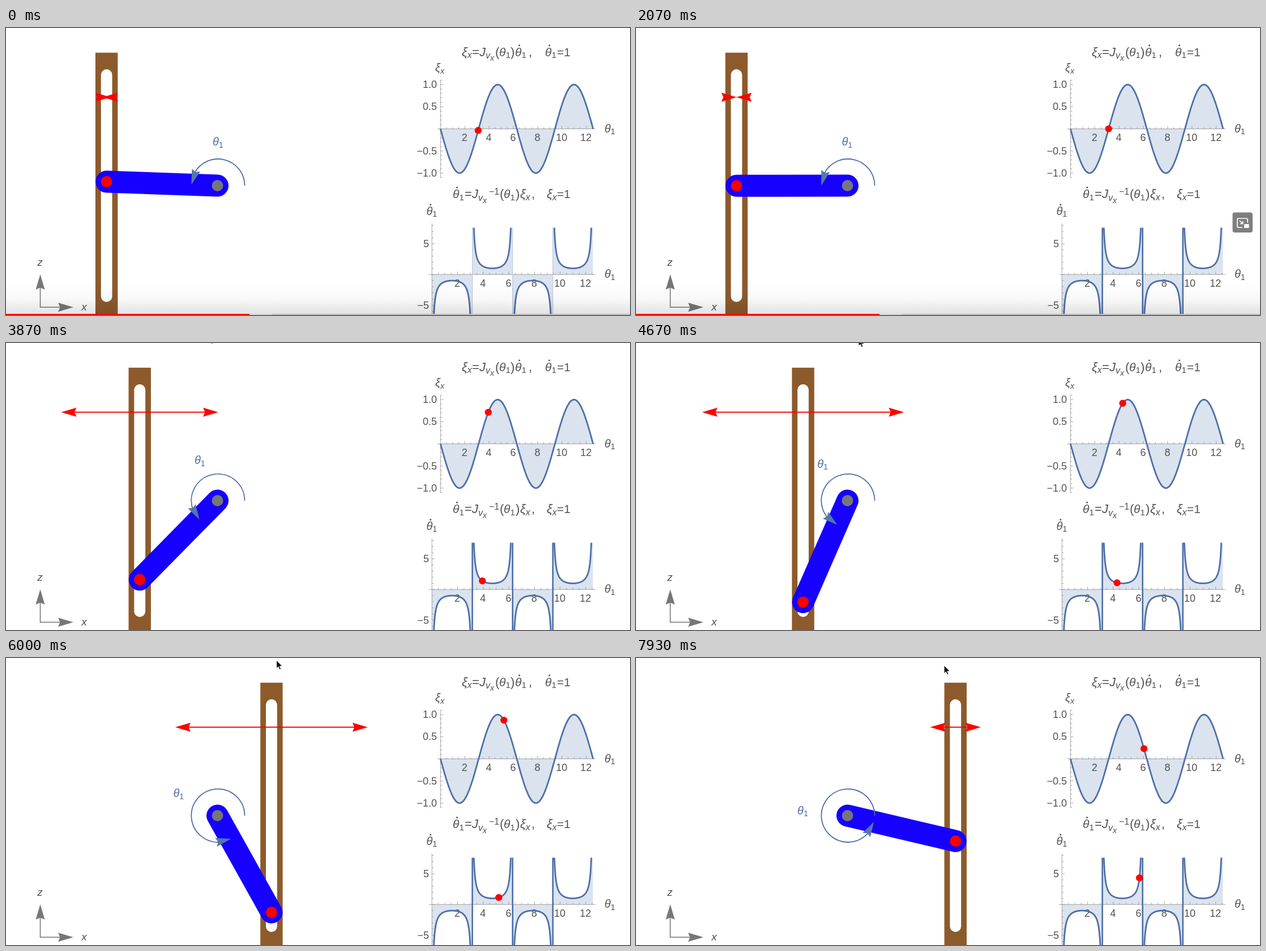
Animation, 1102 px wide and 508 px high, one loop 8 s. Source, as an HTML page:

```html
<!DOCTYPE html>
<html lang="en">
<head>
<meta charset="utf-8">
<title>Slotted link mechanism</title>
<style>
html, body { margin: 0; width: 100%; height: 100%; overflow: hidden; background: #fff; }
svg { display: block; }
text { font-family: "Liberation Sans", Arial, sans-serif; fill: #525252; }
.it { font-style: italic; }
.up { font-style: normal; }
</style>
</head>
<body>
<svg id="stage" width="1102" height="508" viewBox="0 0 1102 508">
  <defs>
    <linearGradient id="shade" x1="0" y1="0" x2="0" y2="1">
      <stop offset="0" stop-color="#000" stop-opacity="0"/>
      <stop offset=".5" stop-color="#000" stop-opacity=".025"/>
      <stop offset="1" stop-color="#000" stop-opacity=".12"/>
    </linearGradient>
    <clipPath id="plotClip"><rect x="752" y="353.5" width="285" height="160"/></clipPath>
  </defs>
</svg>
<script>
const LOOP = 8000, STEP = 1000 / 15;
const PIVOT = [373.5, 279], LINK = 196, SPEED = 194.5;
const BLUE = '#4c6fa9', FILL = '#dbe3ee', AXIS = '#8f8f8f', HEAD = 27;
const stage = document.getElementById('stage');

// Crank angle over time; cursor position over crank angle
const ANGLE = [[1800, 3.106], [2067, 3.143], [2134, 3.143], [3000, 3.7], [3533, 3.79],
  [4400, 4.17], [4467, 4.17], [4667, 4.301], [4734, 4.301], [5333, 4.74], [5400, 4.983],
  [6200, 5.3], [6733, 5.557], [7067, 5.72], [7933, 6.051]];
const CURSOR = [[3.7, 335, -19], [4.301, 393, -9], [4.983, 457, 2], [5.557, 507, 7], [6.051, 544, 13]];
const PIP = [[267, 0], [1000, 1], [2670, 1], [2930, 0]];
const BAR = [[2200, 1], [2600, 0]];

function lerp(table, x, col = 1) {
  if (x <= table[0][0]) return table[0][col];
  for (let i = 1; i < table.length; i++) {
    const a = table[i - 1], b = table[i];
    if (x <= b[0]) return a[col] + (b[col] - a[col]) * (x - a[0]) / (b[0] - a[0]);
  }
  return table[table.length - 1][col];
}

function set(node, attrs) {
  for (const k in attrs) node.setAttribute(k, attrs[k]);
  return node;
}
function add(tag, attrs, parent = stage) {
  return parent.appendChild(set(document.createElementNS('http://www.w3.org/2000/svg', tag), attrs));
}
function path(d, attrs, parent) {
  return add('path', { d, fill: 'none', ...attrs }, parent);
}
function text(str, x, y, size, attrs = {}, parent) {
  const node = add('text', { x, y, 'font-size': size, ...attrs }, parent);
  node.textContent = str;
  return node;
}
const italic = { class: 'it' };

// Letter with a subscript (digits upright), optionally dotted
function symbol(letter, sub, x, y, size, dotted, parent, fill) {
  const paint = fill ? { style: `fill:${fill}` } : {};
  const node = text(letter, x, y, size, { ...italic, ...paint }, parent);
  const style = sub === '1' ? 'up' : 'it';
  add('tspan', { dy: size * .18, 'font-size': size * .72, class: style }, node).textContent = sub;
  if (dotted) add('circle', { cx: x + size * .36, cy: y - size * .89, r: 1.5, fill: '#525252' }, parent);
}

// Notched arrow head with its tip at (x, y), pointing along angle a
function head(x, y, a, half = 8) {
  const c = Math.cos(a), s = Math.sin(a);
  const pts = [[0, 0], [-HEAD, half], [-HEAD * .87, 0], [-HEAD, -half]];
  return 'M' + pts.map(([u, v]) => `${x + u * c - v * s} ${y + u * s + v * c}`).join('L') + 'Z';
}

function curve(x0, sx, y0, f, from, to) {
  const pts = [];
  for (let i = 0; i <= 160; i++) {
    const q = from + (to - from) * i / 160;
    pts.push(`${(x0 + sx * q).toFixed(2)} ${(y0 + f(q)).toFixed(2)}`);
  }
  return pts.join('L');
}

function axes(p) {
  let d = `M${p.left} ${p.y}H1041M${p.x} ${p.top}V${p.bottom}`;
  for (let i = 1; i <= 25; i++) d += `M${p.x + i * p.sx / 2} ${p.y}v${i % 4 ? -3 : -5}`;
  for (let i = -p.ticks; i <= p.ticks; i++) {
    const y = p.y - i * p.tick;
    if (y > p.top && y < p.bottom) d += `M${p.x} ${y}h${i % 5 ? 3 : 5}`;
  }
  path(d, { stroke: AXIS, 'stroke-width': .8 });
  for (let n = 2; n <= 12; n += 2)
    text(n, p.x + n * p.sx - .5, p.y + 21.5, 18, { 'text-anchor': 'middle' });
  for (const [label, v] of p.labels)
    text(label, p.labelX, p.y - v * p.tick + 6, 18, { 'text-anchor': 'end' });
  symbol('θ', '1', 1057, p.y + 6, 20);
}

// Upper plot
const up = { x: 767.3, y: 178.5, sx: 21.45, left: 762, top: 92, bottom: 265, tick: 7.83, ticks: 11, labelX: 761,
  labels: [['1.0', 10], ['0.5', 5], ['−0.5', -5], ['−1.0', -10]] };
const sine = 'M' + curve(up.x, up.sx, up.y, q => 78.3 * Math.sin(q), 0, 4 * Math.PI);
path(sine + `L${up.x + up.sx * 4 * Math.PI} ${up.y}H${up.x}Z`, { fill: FILL });
axes(up);
path(sine, { stroke: BLUE, 'stroke-width': 2.8 });

symbol('ξ', 'x', 805, 49.5, 22);
text('=', 823, 49.5, 22);
text('J', 836, 49.5, 22, italic);
text('v', 847, 54, 16, italic);
text('x', 855, 58, 14, italic);
text('(', 864, 49.5, 22);
symbol('θ', '1', 871, 49.5, 21);
text(')', 891, 49.5, 22);
symbol('θ', '1', 899, 49.5, 21, true);
text(',', 923, 49.5, 22);
symbol('θ', '1', 952, 49.5, 21, true);
text('=1', 973, 49.5, 21);
symbol('ξ', 'x', 758, 77, 20);

// Lower plot
const low = { x: 752.2, y: 436.3, sx: 22.63, left: 747, top: 346, bottom: 508, tick: 10.85, ticks: 8, labelX: 747,
  labels: [['5', 5], ['−5', -5]] };
const lowArea = add('g', { 'clip-path': 'url(#plotClip)' });
axes(low);
const lowLines = add('g', { 'clip-path': 'url(#plotClip)' });
let walls = '';
for (let n = 0; n < 4; n++) {
  const a = n * Math.PI + .02, b = (n + 1) * Math.PI - .02;
  const d = curve(low.x, low.sx, low.y, q => low.tick / Math.sin(q), a, b);
  path(`M${low.x + low.sx * n * Math.PI} ${low.y}L${d}L${low.x + low.sx * (n + 1) * Math.PI} ${low.y}Z`,
    { fill: FILL }, lowArea);
  path('M' + d, { stroke: BLUE, 'stroke-width': 2.8 }, lowLines);
  if (n) walls += `M${low.x + low.sx * n * Math.PI + .3} 353V508`;
}
const wallPath = path(walls, {}, lowLines);

symbol('θ', '1', 789, 301, 21, true);
text('=', 810, 301, 22);
text('J', 823, 301, 22, italic);
text('v', 834, 305.5, 16, italic);
text('x', 842, 309.5, 14, italic);
text('−1', 853, 295, 16);
text('(', 872, 301, 22);
symbol('θ', '1', 879, 301, 21);
text(')', 900, 301, 22);
symbol('ξ', 'x', 908, 301, 22);
text(',', 928, 301, 22);
symbol('ξ', 'x', 955, 301, 22);
text('=1', 973, 301, 21);
symbol('θ', '1', 742.5, 330.5, 20, true);

const dots = [0, 1].map(() => add('circle', { r: 6.2, fill: '#f00' }));

// Coordinate cross
path('M60.5 450V494.3H100', { stroke: '#777', 'stroke-width': 1.6 });
path(head(60.5, 436, -Math.PI / 2) + head(119, 494.3, 0), { fill: '#777' });
text('z', 60, 421, 19, { ...italic, 'text-anchor': 'middle' });
text('x', 138, 500, 19, { ...italic, 'text-anchor': 'middle' });

// Mechanism
const slider = add('g', {});
add('rect', { x: -19.7, y: 43.7, width: 39.4, height: 470, fill: '#8d5a2b' }, slider);
add('rect', { x: -9.9, y: 73, width: 19.8, height: 412, rx: 9.9, fill: '#fff' }, slider);
const link = add('line', { x1: PIVOT[0], y1: PIVOT[1], stroke: '#1600ff', 'stroke-width': 39, 'stroke-linecap': 'round' });
add('circle', { cx: PIVOT[0], cy: PIVOT[1], r: 10, fill: '#777' });
const pin = add('circle', { r: 10, fill: '#f00' });
const speedLine = path('', { stroke: '#f00', 'stroke-width': 1.8 });
const speedHeads = path('', { fill: '#f00' });
const arc = path('', { stroke: BLUE, 'stroke-width': 1.8 });
const arcHead = path('', { fill: '#5577a9' });
const label = add('g', {});
symbol('θ', '1', -10, 6.5, 20, false, label, BLUE);

// Player overlay
const bar = add('g', {});
add('rect', { y: 450, width: 1102, height: 58, fill: 'url(#shade)' }, bar);
add('rect', { y: 506, width: 1102, height: 2, fill: '#bcbcbc' }, bar);
add('rect', { y: 506, width: 469, height: 2, fill: '#d2d2d2' }, bar);
add('rect', { y: 506, width: 430, height: 2, fill: '#f00' }, bar);

const pip = add('g', {});
add('rect', { x: 1053.5, y: 326.5, width: 35.5, height: 35.5, rx: 4, fill: '#7f7f7f' }, pip);
path('M1071 353H1064Q1062 353 1062 351V339Q1062 337 1064 337H1078Q1080 337 1080 339V344.5M1066 341L1071 346M1071.5 342V346.5H1067',
  { stroke: '#fff', 'stroke-width': 1.7 }, pip);
add('rect', { x: 1074, y: 347, width: 8.5, height: 7, rx: 1, fill: '#fff' }, pip);

const cursor = path('M0 0V14.5L3.3 11.5L5.6 16.6L8 15.5L5.8 10.6H10.5Z',
  { fill: '#111', stroke: '#fff', 'stroke-width': 1, 'stroke-linejoin': 'round' });

function draw(t) {
  const q = lerp(ANGLE, t), sin = Math.sin(q);
  const x = PIVOT[0] + LINK * Math.cos(q), y = PIVOT[1] - LINK * sin;

  set(slider, { transform: `translate(${x} 0)` });
  set(link, { x2: x, y2: y });
  set(pin, { cx: x, cy: y });

  const v = -SPEED * sin, dir = v < 0 ? Math.PI : 0, inset = (v < 0 ? -1 : 1) * Math.min(20, Math.abs(v));
  set(speedLine, { d: `M${x - v + inset} 122.5H${x + v - inset}` });
  set(speedHeads, { d: head(x + v, 122.5, dir) + head(x - v, 122.5, dir + Math.PI) });

  const r = 47.1, cx = 374.4, cy = 278.9;
  const at = a => [cx + r * Math.cos(a), cy - r * Math.sin(a)];
  const tip = at(q), back = at(q - .56), end = at(q - .42);
  set(arc, { d: `M${at(0)}A${r} ${r} 0 ${q - .42 > Math.PI ? 1 : 0} 0 ${end}` });
  set(arcHead, { d: head(tip[0], tip[1], Math.atan2(tip[1] - back[1], tip[0] - back[0]), 7.7) });
  set(label, { transform: `translate(${PIVOT[0] + 79 * Math.cos(q / 2)} ${PIVOT[1] - 77.5 * Math.sin(q / 2)})` });

  set(dots[0], { cx: up.x + up.sx * q, cy: up.y + 78.3 * sin });
  const inverse = -1 / sin;
  const shown = Math.abs(inverse) < 7.6;
  set(dots[1], { visibility: shown ? 'visible' : 'hidden' });
  if (shown) set(dots[1], { cx: low.x + low.sx * q, cy: low.y - low.tick * inverse });

  const moving = t > 1860;
  set(wallPath, { stroke: moving ? BLUE : '#b4c4dc', 'stroke-width': moving ? 2.6 : 1 });
  set(bar, { opacity: lerp(BAR, t) });
  set(pip, { opacity: lerp(PIP, t) });
  set(cursor, { transform: `translate(${lerp(CURSOR, q, 1)} ${lerp(CURSOR, q, 2)})` });
}

const start = performance.now();
function tick() {
  const t = (performance.now() - start) % LOOP;
  draw(Math.floor((t + 4) / STEP) * STEP);
  requestAnimationFrame(tick);
}
tick();
</script>
</body>
</html>
```
